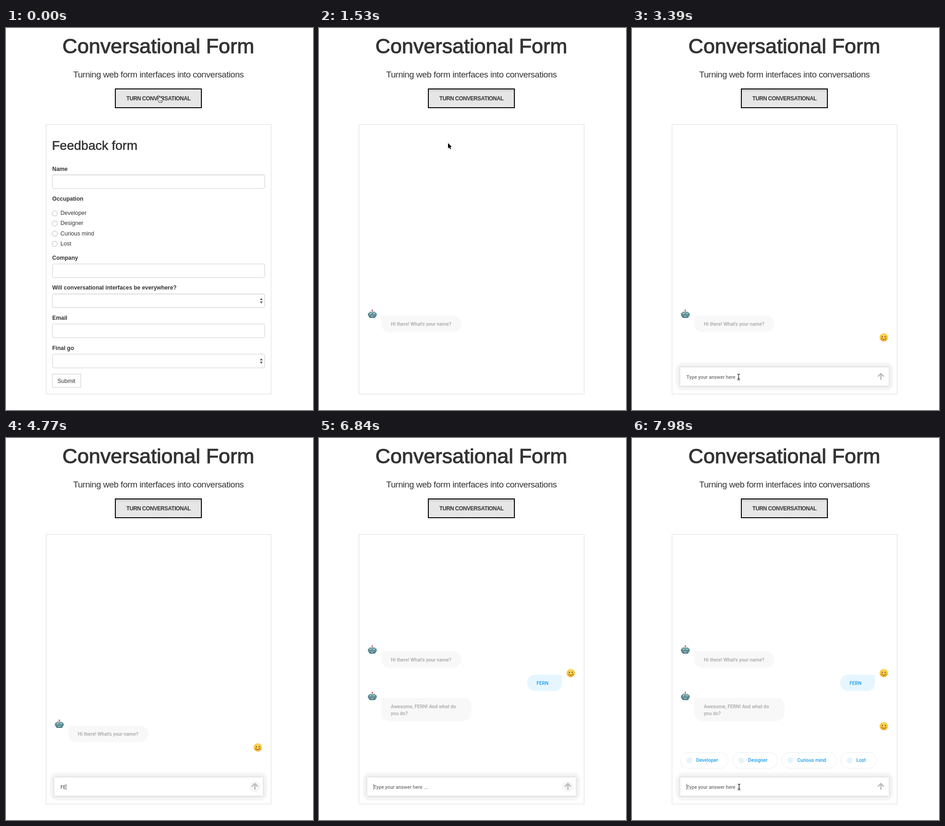
An HTML page for the animation above (8000 ms loop, 671x834 px).

```html
<!DOCTYPE html>
<html lang="en">
<head>
<meta charset="utf-8">
<title>Conversational Form</title>
<style>
  html, body { margin: 0; width: 100%; height: 100%; overflow: hidden; background: #fff; }
  svg { display: block; }
  text { font-family: "Liberation Sans", Arial, sans-serif; font-size: 12.5px; fill: #333; white-space: pre; }
  .mid { text-anchor: middle; }
  .title { font-size: 45.2px; stroke: #333; stroke-width: 1.1px; }
  .lead { font-size: 19px; letter-spacing: -.44px; }
  .press { font-size: 12px; font-weight: bold; letter-spacing: -.43px; }
  .head { font-size: 28px; stroke: #333; stroke-width: .6px; }
  .label { font-size: 12.4px; font-weight: bold; }
  .chat text { font-family: Roboto, sans-serif; font-size: 10.63px; font-weight: 500; }
  .bot text { fill: #a6a6a6; }
  .bot path { fill: #f8f8f8; }
  .bot circle { fill: #b4b4b4; }
  .user text, #pills text { fill: #1c9fee; }
  .user path { fill: #e6f6ff; }
  .user circle { fill: #3fa4dd; }
  .field { fill: #fff; stroke: #ccc; }
  .line { fill: none; stroke: #bdbdbd; stroke-width: 3; }
</style>
</head>
<body>
<svg width="671" height="834" viewBox="0 0 671 834">
  <defs>
    <clipPath id="panel"><rect x="88" y="211" width="491" height="588"/></clipPath>
    <filter id="soft" x="-10%" y="-60%" width="120%" height="220%"><feGaussianBlur stdDeviation="2.4"/></filter>
    <filter id="edge" x="-10%" y="-60%" width="120%" height="220%"><feGaussianBlur stdDeviation="1"/></filter>
    <linearGradient id="inset" x2="0" y2="1">
      <stop stop-opacity=".13"/><stop offset=".16" stop-opacity="0"/>
    </linearGradient>
    <radialGradient id="gold" cy=".35" r=".7">
      <stop stop-color="#ffe368"/><stop offset=".6" stop-color="#fcc63a"/><stop offset="1" stop-color="#e99a22"/>
    </radialGradient>
    <linearGradient id="steel" x2="0" y2="1">
      <stop stop-color="#a3bdc1"/><stop offset=".5" stop-color="#6b979e"/><stop offset="1" stop-color="#3f737e"/>
    </linearGradient>
    <g id="robot">
      <path d="M0-7V-4" style="fill:none" stroke="#8a6f70" stroke-width="1.6"/>
      <circle cy="-7.8" r="1.6" style="fill:#d9604f"/>
      <rect x="-9.5" y="-2" width="19" height="7" rx="2" fill="#4c7782"/>
      <path d="M-5-5H5Q8-4 8 0V5Q7 9 4 9H-4Q-7 9-8 5V0Q-8-4-5-5Z" style="fill:url(#steel)"/>
      <g stroke="#2f616c"><circle cx="-3.6" cy="-.3" r="2.1" style="fill:#c9f1f3"/><circle cx="3.6" cy="-.3" r="2.1" style="fill:#c9f1f3"/></g>
      <path d="M-3 5.6H3" stroke="#b9d0d3" stroke-width="1.4"/>
    </g>
    <g id="smile">
      <circle r="9" fill="url(#gold)"/>
      <ellipse cx="-3" cy="-1.6" rx="1.2" ry="1.6" fill="#68431a"/>
      <ellipse cx="3" cy="-1.6" rx="1.2" ry="1.6" fill="#68431a"/>
      <path d="M-5 2.2Q0 7 5 2.2" fill="none" stroke="#85551c" stroke-width="1.3" stroke-linecap="round"/>
    </g>
    <g id="dots"><circle r="1.15"/><circle cx="4.5" r="1.15"/><circle cx="9" r="1.15"/></g>
  </defs>

  <text class="title mid" x="333" y="55">Conversational Form</text>
  <text class="lead mid" x="333.2" y="108">Turning web form interfaces into conversations</text>
  <rect id="button" x="239" y="133" width="188" height="41" fill="#e6e6e6"/>
  <rect id="dent" x="240" y="134" width="186" height="39" fill="url(#inset)"/>
  <rect x="239" y="133" width="188" height="41" fill="none" stroke="#000" stroke-width="2"/>
  <text class="press mid" x="333.2" y="158">TURN CONVERSATIONAL</text>
  <rect x="87.5" y="210.5" width="492" height="588.5" fill="none" stroke="#ddd"/>

  <g id="form"></g>

  <g clip-path="url(#panel)" class="chat">
    <g id="thread">
      <g id="bot1" class="bot">
        <use href="#robot" x="116.5" y="624"/>
        <path id="bubble1"/>
        <use id="dots1" href="#dots" x="158.5" y="647.5"/>
        <text id="say1" x="157" y="650">Hi there! What's your name?</text>
      </g>
      <use id="face1" href="#smile" x="550.3" y="675.5"/>
      <g id="reply" class="user">
        <path d="M472.5 679H531V696Q531 714.5 513 714.5H472.5A17.75 17.75 0 0 1 472.5 679Z"/>
        <use id="dots2" href="#dots" x="478" y="699.5"/>
        <text id="answer" x="475.5" y="701">FERN</text>
      </g>
      <g id="bot2" class="bot">
        <use href="#robot" x="116.5" y="725.5"/>
        <path id="bubble2"/>
        <use id="dots3" href="#dots" x="158.5" y="748.5"/>
        <g id="say2">
          <text x="157" y="752">Awesome, FERN! And what do</text>
          <text x="157" y="767">you do?</text>
        </g>
      </g>
      <use id="face2" href="#smile" x="550.3" y="791.5"/>
    </g>
    <g id="pills"></g>
    <g id="bar">
      <rect id="ring" x="96" y="730.5" width="475" height="61" rx="16" fill="#f5f5f5" filter="url(#edge)"/>
      <rect x="105" y="740.5" width="457" height="41.5" fill="#000" opacity=".15" filter="url(#soft)"/>
      <rect x="105.5" y="741" width="456" height="40" fill="#fff"/>
      <circle id="halo" cx="544" cy="761" r="12" fill="#f6f6f6"/>
      <path class="line" d="M544 768V755M537.5 761L544 754.5L550.5 761"/>
      <text id="typed" x="119" y="765.5"></text>
      <path id="caret" d="M0 755V768" stroke="#666"/>
    </g>
  </g>

  <g id="hand"><path d="M3 1Q4.3-.6 5.5 1L6.3 5Q7.5 4 8.6 5.3Q10 4.5 11 6Q12.7 5.7 13 7.5Q13.3 10 12 12.5V15.5H5.5Q4.5 12.5 1 9.5Q.6 7.6 2.3 8L4 9.3Z" fill="#fff" stroke="#222"/><path d="M6.6 10V13M8.6 10V13M10.5 10V13" stroke="#333" stroke-width=".8"/></g>
  <path id="arrow" d="M0 0V11.8L2.7 9.3L4.6 13.6L6.5 12.8L4.7 8.6H8.3Z" stroke="#fff" stroke-width="1.2" paint-order="stroke"/>
  <g id="beam" fill="none">
    <path d="M-3-6.5Q0-6.5 0-4Q0-6.5 3-6.5M0-5V5M-3 6.5Q0 6.5 0 4Q0 6.5 3 6.5M-1.5 2.5H1.5" stroke="#fff" stroke-width="3.4"/>
    <path d="M-3-6.5Q0-6.5 0-4Q0-6.5 3-6.5M0-5V5M-3 6.5Q0 6.5 0 4Q0 6.5 3 6.5M-1.5 2.5H1.5" stroke="#111" stroke-width="1.2"/>
  </g>
</svg>
<script>
const LOOP = 8000;
const el = id => document.getElementById(id);
const label = (y, s) => `<text class="label" x="101" y="${y}">${s}</text>`;
const field = y => `<rect class="field" x="101.5" y="${y}" width="464" height="30" rx="3.5"/>
  <path d="M104 ${y + 1}H563" stroke="#f0f0f0"/>`;
const select = y => field(y) + `<path fill="#555" d="M555 ${y + 13.5}h6l-3-4.5zM555 ${y + 16.5}h6l-3 4.5z"/>`;
const radio = (s, i) => `<circle cx="106.5" cy="${404.7 + 22.1 * i}" r="5.8" fill="#fff" stroke="#b0b0b0"/>
  <text x="119" y="${408.3 + 22.1 * i}">${s}</text>`;
const jobs = ["Developer", "Designer", "Curious mind", "Lost"];

el("form").innerHTML = `<text class="head" x="100.5" y="266">Feedback form</text>`
  + label(311.5, "Name") + field(320.5)
  + label(377, "Occupation") + jobs.map(radio).join("")
  + label(505.8, "Company") + field(515)
  + label(571.3, "Will conversational interfaces be everywhere?") + select(580.5)
  + label(637, "Email") + field(646)
  + label(702.8, "Final go") + select(712)
  + `<rect x="101.5" y="755.5" width="62" height="29" fill="#fff" stroke="#ccc"/>
     <text x="112.5" y="774.5">Submit</text>`;

const pillBox = [[106, 104], [219.5, 98.5], [327, 120], [456, 78]];
el("pills").innerHTML = pillBox.map(([x, w], i) => `<g>
  <rect x="${x}" y="686.5" width="${w}" height="34.5" rx="17.25" fill="#fff" stroke="#e6eef3"/>
  <circle cx="${x + 19.3}" cy="703.7" r="6.4" fill="#e5f3fd"/>
  <text x="${x + 34.3}" y="707">${jobs[i]}</text></g>`).join("");

const bubble = (y, w, h) => `M136 ${y}H${118 + w}a18 18 0 0 1 18 18V${y + h - 18}a18 18 0 0 1 -18 18H154a18 18 0 0 1 -18 -18Z`;

const clamp = v => Math.max(0, Math.min(1, v));
const ramp = (t, from, to) => clamp((t - from) / (to - from));
const out = (t, from, to) => 1 - (1 - ramp(t, from, to)) ** 3;
const inOut = (t, from, to) => { const p = ramp(t, from, to); return p * p * (3 - 2 * p); };
const fade = (node, v) => node.setAttribute("opacity", v);
const show = (id, on) => el(id).setAttribute("visibility", on ? "visible" : "hidden");
const move = (node, x, y) => node.setAttribute("transform", `translate(${x} ${y})`);
const rise = (node, p, by = 20) => { fade(node, p); move(node, 0, by * (1 - p)); };

const mousePath = [[0, 329, 147], [300, 329, 147], [650, 332, 151], [1050, 332, 151],
  [1500, 282, 251], [1650, 282, 253], [2200, 233, 762], [3390, 233, 762], [7600, 234, 762], [LOOP, 234, 762]];
function mouseAt(t) {
  const i = Math.max(1, mousePath.findIndex(k => k[0] > t));
  const [a, x0, y0] = mousePath[i - 1], [b, x1, y1] = mousePath[i];
  const p = inOut(t, a, b);
  return [x0 + (x1 - x0) * p, y0 + (y1 - y0) * p];
}

const name = "FERN", keys = [3930, 4500, 4950, 5280];

function draw(t) {
  const pressed = t >= 620 && t < 1130;
  el("button").setAttribute("fill", pressed ? "#d4d4d4" : "#e6e6e6");
  show("dent", t >= 620);
  fade(el("form"), 1 - ramp(t, 770, 1140));

  // conversation
  rise(el("bot1"), out(t, 850, 1250));
  const asked = t >= 1320, answered = t >= 6300, asked2 = t >= 6750;
  el("bubble1").setAttribute("d", bubble(628, asked ? 175 : 72, 36));
  show("dots1", !asked);
  show("say1", asked);
  rise(el("face1"), out(t, 2100, 2450), 10);
  rise(el("reply"), out(t, 5850, 6150));
  show("dots2", !answered);
  show("answer", answered);
  rise(el("bot2"), out(t, 6520, 6800));
  el("bubble2").setAttribute("d", bubble(729.5, asked2 ? 197.5 : 72, asked2 ? 50.5 : 36));
  show("dots3", !asked2);
  show("say2", asked2);
  rise(el("face2"), out(t, 7000, 7300), 10);
  move(el("thread"), 0, -162.3 * inOut(t, 6480, 6800));
  [...el("pills").children].forEach((pill, i) => rise(pill, out(t, 7120 + 90 * i, 7450 + 90 * i), 10));

  // answer bar
  const enter = out(t, 1750, 2150), sent = t >= 5800 && t < 6320;
  rise(el("bar"), enter, 50);
  fade(el("ring"), ramp(t, 2000, 2250) * (1 - ramp(t, 5800, 6050) + ramp(t, 6320, 6500)));
  fade(el("halo"), ramp(t, 3930, 4150) * (1 - ramp(t, 7450, 7650)));
  const count = t < 6320 ? keys.filter(k => t >= k).length : 0;
  const typed = el("typed");
  typed.textContent = count ? name.slice(0, count) : "Type your answer here ...";
  typed.style.fill = sent ? "#b5b5b5" : count ? "#666" : "#757575";
  move(el("caret"), 119.5 + (count ? typed.getComputedTextLength() : 0), 0);
  show("caret", t > 2150 && !sent && (t + 300) % 1000 < 500);

  // pointer
  const [x, y] = mouseAt(t);
  const awake = t < 3900 || t >= 7600;
  const kind = !awake ? "" : y < 174 ? "hand" : y < 741 ? "arrow" : "beam";
  for (const id of ["hand", "arrow", "beam"]) {
    show(id, id === kind);
    move(el(id), x, y);
  }
}

const start = performance.now();
function tick() {
  draw((performance.now() - start) % LOOP);
  requestAnimationFrame(tick);
}
tick();
</script>
</body>
</html>
```
